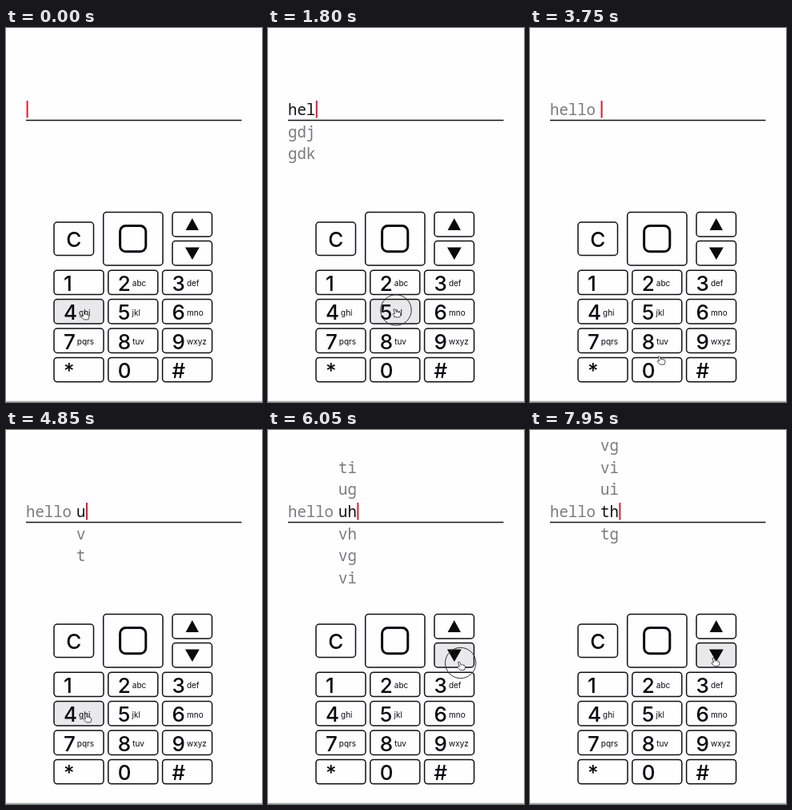
These frames come from a looping animation (320 px wide and 468 px high, 8 s). An HTML page:

```html
<!DOCTYPE html>
<html lang="en">
<head>
<meta charset="utf-8">
<title>Keypad typing</title>
<style>
  html, body { margin: 0; width: 100%; height: 100%; overflow: hidden; background: #fefdff; }
  svg { display: block; width: 320px; height: 468px; }
  .key rect { fill: #fefdff; stroke: #111; stroke-width: 1.5; }
  .key.hover rect { fill: #e9e8ea; }
  .key text { font: 500 26px Inter, Roboto, sans-serif; fill: #0a0a0a; }
  .key .letters { font-size: 10px; font-weight: 400; }
  .entry text { font: 19px "Noto Sans Mono", "DejaVu Sans Mono", monospace; fill: #7a7a7a; white-space: pre; }
  .entry .current { fill: #111; }
</style>
</head>
<body>
<svg viewBox="0 0 320 468">
  <g class="entry" id="entry"></g>
  <path d="M25 115.6H294.5" stroke="#151515" stroke-width="1.5"/>
  <rect id="caret" y="91" width="2" height="21.5" fill="#d8202f"/>
  <g id="keys"></g>
  <rect x="142.6" y="247.6" width="32.2" height="32.2" rx="7" fill="none" stroke="#0a0a0a" stroke-width="3"/>
  <path d="M232.8 238L241 253H224.6ZM224 274.5H241.8L232.9 290Z" fill="#0a0a0a"/>
  <path d="M0 467.3H320" stroke="#8c958c"/>
  <g id="pointer">
    <circle id="ring" r="19.2" fill="none" stroke="#333"/>
    <path transform="translate(.4 -.8) scale(.88)" d="M-4 0Q-2-2-1 1L0 4Q2 2 3 4 5 3 5 5 7 5 6 8L5 11H-1L-5 7Q-5 5-2 6Z"
      fill="#fff" stroke="#333" stroke-linejoin="round"/>
  </g>
</svg>
<script>
const LOOP = 8000, HOLD = 100, TRAVEL = 550, SETTLE = 180, REPEAT = 200;
const LEFT = 25, PITCH = 11.4, SPACE = 6, BASELINE = 108.9, ROW = 27.7;
const $ = id => document.getElementById(id);

function add(parent, tag, attrs, text = '') {
  const node = document.createElementNS('http://www.w3.org/2000/svg', tag);
  for (const name in attrs) node.setAttribute(name, attrs[name]);
  node.textContent = text;
  parent.append(node);
  return node;
}

const keys = [];
function addKey(x, y, width, height, label = '', letters = '') {
  const node = add($('keys'), 'g', { class: 'key' });
  add(node, 'rect', { x, y, width, height, rx: 4 });
  const text = add(node, 'text', { x: x + 12, y: y + 25.5 }, label);
  if (letters) add(text, 'tspan', { class: 'letters', dx: 2, dy: -5.5 }, letters);
  keys.push({ node, x, y, width, height });
  return text;
}

const clear = addKey(60, 243, 49.5, 41.5, 'C');
clear.setAttribute('x', 75.2);
clear.setAttribute('y', 273.5);
addKey(121.7, 230.5, 74.3, 66.5);
for (const y of [230.5, 266.5]) addKey(208, y, 49.5, 30.5);
const letters = ' abc def ghi jkl mno pqrs tuv wxyz'.split(' ');
[...'123456789*0#'].forEach((label, i) =>
  addKey(60 + i % 3 * 67.8, 303.2 + Math.floor(i / 3) * 36.4, 62, 30.4, label, letters[i]));

// Each tap presses at a point and, on release, shows its candidates.
const taps = [];
function tap(at, x, y, list, word = '', selected = 0) {
  taps.push({ at, x, y, items: list.split(' '), word, selected });
}

tap(300, 98, 356, 'i h g');
tap(1100, 221, 325, 'he id if');
tap(1600, 160, 353, 'hel gdj gdk');
tap(1600 + REPEAT, 160, 353, 'hell gdjj gdjk');
tap(2300, 230, 353, 'hello gdjkm gdjjo gdjlm');
tap(3350, 160, 422, '', 'hello');
tap(4200, 168, 397, 'u v t', 'hello');
const pairs = 'ti ug uh vh vg vi ui th tg';
tap(5000, 101, 357, pairs, 'hello');
for (let i = 1; i <= 7; i++)
  tap(5400 + i * REPEAT, 240.7, 291.5, pairs, 'hello', i);
tap(LOOP + 130, 231, 286.5, pairs, 'hello', 8);

const empty = { items: [''], word: '', selected: 0 };
const clamp = v => Math.min(1, Math.max(0, v));
const ease = p => p * p * (3 - 2 * p);

// The pointer leaves late enough to settle on the next key shortly before pressing it.
function pointerAt(t) {
  const next = taps.findIndex(tap => t < tap.at + HOLD);
  const to = taps[next], from = taps[next - 1] || to;
  const arrive = to.at - SETTLE;
  const leave = Math.max(from.at + 2 * HOLD, arrive - TRAVEL);
  const p = from === to ? 1 : ease(clamp((t - leave) / (arrive - leave)));
  return { x: from.x + (to.x - from.x) * p, y: from.y + (to.y - from.y) * p, pressed: t >= to.at };
}

let shown;
function showEntry(state) {
  if (state === shown) return;
  shown = state;
  const { items, word, selected } = state;
  const x = LEFT + (word && word.length * PITCH + SPACE);
  $('entry').replaceChildren();
  add($('entry'), 'text', { x: LEFT, y: BASELINE }, word);
  items.forEach((item, i) => {
    const row = i - selected;
    if (Math.abs(row) > 3) return;
    add($('entry'), 'text', { x, y: BASELINE + row * ROW, class: row ? '' : 'current' }, item);
  });
  $('caret').setAttribute('x', +x + items[selected].length * PITCH + .6);
}

function draw() {
  const t = performance.now() % LOOP;
  const { x, y, pressed } = pointerAt(t);
  showEntry(taps.findLast(tap => t >= tap.at + HOLD) || empty);
  for (const k of keys)
    k.node.classList.toggle('hover', x > k.x && x < k.x + k.width && y > k.y && y < k.y + k.height);
  $('pointer').setAttribute('transform', `translate(${x} ${y})`);
  $('ring').style.display = pressed ? '' : 'none';
  requestAnimationFrame(draw);
}
draw();
</script>
</body>
</html>
```
